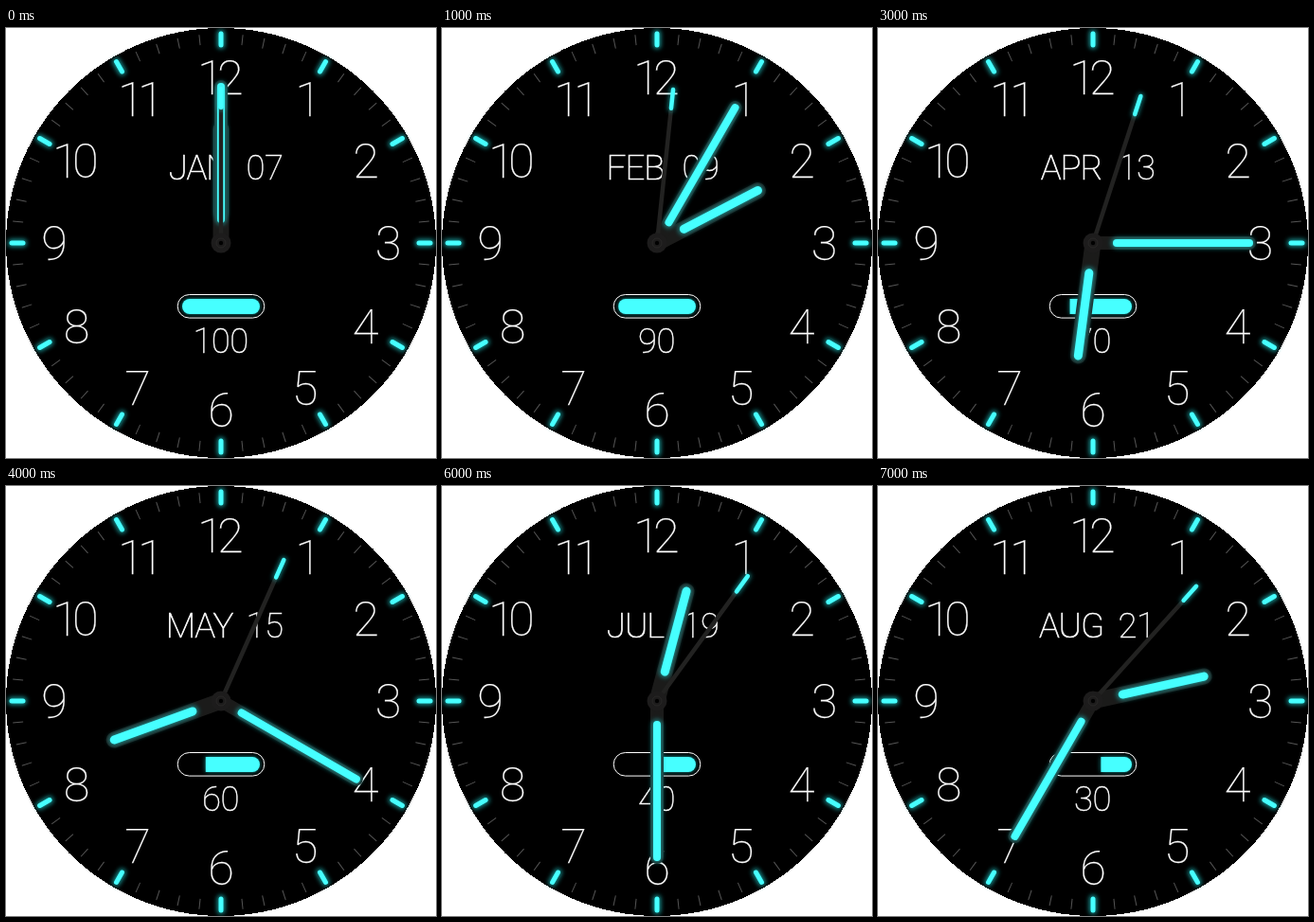
An HTML page for the animation above (8000 ms loop, 454 by 454 pixels).

```html
<!DOCTYPE html>
<html lang="en">
<head>
<meta charset="utf-8">
<title>Watch face</title>
<style>
html, body { margin: 0; width: 100%; height: 100%; overflow: hidden; background: #fff; }
svg { display: block; width: 100vw; height: 100vh; }
text { font-family: Roboto, Lato, sans-serif; font-weight: 200; fill: #fff; stroke: #fff; stroke-width: .25px; }
.num { font-size: 50.6px; }
.month { font-size: 36.6px; letter-spacing: -1px; stroke-width: .7px; }
.small { font-size: 36.6px; letter-spacing: -.6px; stroke-width: .45px; }
.mid { text-anchor: middle; }
.pair { letter-spacing: -6.8px; }
line { stroke-linecap: round; }
.lume { stroke: #46ffff; }
.glow { stroke: #20d8d8; filter: url(#blur); }
</style>
</head>
<body>
<svg viewBox="-227 -227 454 454">
  <defs>
    <filter id="blur" filterUnits="userSpaceOnUse" x="-230" y="-230" width="460" height="460">
      <feGaussianBlur stdDeviation="2.4"/>
    </filter>
    <clipPath id="level"><rect id="cut" x="-49" y="50" width="100" height="35"/></clipPath>
    <rect id="cell" x="-41" y="59" width="82" height="16" rx="8" clip-path="url(#level)"/>
  </defs>
  <circle r="227" shape-rendering="crispEdges"/>
  <g id="ticks"></g>
  <g id="labels"></g>
  <g filter="url(#blur)" opacity=".65"><use href="#cell" fill="#20d8d8"/></g>
  <use href="#cell" fill="#46ffff"/>
  <rect x="-45.8" y="54.5" width="91.6" height="24.6" rx="12.3" fill="none" stroke="#fff"/>
  <g id="hands"></g>
  <circle r="10.5" fill="#1d1c1c"/>
  <circle r="5" fill="none" stroke="#292827"/>
  <circle r="2.2"/>
</svg>
<script>
const STEP = 1000, STEPS = 8;
const MONTHS = ["JAN", "FEB", "MAR", "APR", "MAY", "JUN", "JUL", "AUG"];
const $ = id => document.getElementById(id);

function add(parent, tag, attrs) {
  const el = document.createElementNS("http://www.w3.org/2000/svg", tag);
  for (const key in attrs) el.setAttribute(key, attrs[key]);
  return parent.appendChild(el);
}

// A radial line pointing at 12 o'clock, from radius a to radius b.
function ray(parent, a, b, width, attrs) {
  return add(parent, "line", { x1: 0, y1: -a, x2: 0, y2: -b, "stroke-width": width, ...attrs });
}

function label(x, y, cls, str = "") {
  const el = add($("labels"), "text", { x: x - 227, y: y - 227, class: cls });
  el.textContent = str;
  return el;
}

function lume(parent, a, b, width, spread, opacity) {
  ray(parent, a, b, width + spread, { class: "glow", opacity });
  ray(parent, a, b, width, { class: "lume" });
}

function hand(a, b, width, body) {
  const g = add($("hands"), "g", {});
  ray(g, 0, b, body, { stroke: "#1b1b1a" });
  lume(g, a, b, width, 3, .6);
  return g;
}

for (let i = 0; i < 60; i++) {
  const g = add($("ticks"), "g", { transform: `rotate(${i * 6})` });
  if (i % 5) ray(g, 210, 221, 1, { stroke: "#555", style: "stroke-linecap:butt" });
  else lume(g, 209, 221, 5, 3, .7);
}

[[319, 92.5], [380, 157.5], [403.5, 245], [379.5, 333], [315.5, 398],
 [227, 421], [139, 398], [74.5, 333], [51, 245]]
  .forEach(([x, y], i) => label(x, y, "num mid", i + 1));
[[49, 157.5], [118, 92.5], [202, 69.5]]
  .forEach(([x, y], i) => label(x, y, "num pair", i + 10));

const month = label(204, 160, "month mid");
const day = label(273, 160, "small mid");
const charge = label(226.5, 343, "small mid");

const hour = hand(32, 120, 9, 17);
const minute = hand(25, 165, 8, 14);
const second = add($("hands"), "g", {});
ray(second, 0, 142, 4.5, { stroke: "#222221" });
lume(second, 143, 163, 4.5, 2, .6);

const turn = (el, deg) => el.setAttribute("transform", `rotate(${deg})`);

function draw(k) {
  const level = 100 - 10 * k;
  month.textContent = MONTHS[k];
  day.textContent = String(7 + 2 * k).padStart(2, "0");
  charge.textContent = level;
  $("cut").setAttribute("x", -8 + (50 - level) * .82);
  turn(hour, 62.5 * k);
  turn(minute, 30 * k);
  turn(second, 6 * k);
}

const start = performance.now();
let shown = -1;
function tick() {
  const k = Math.floor((performance.now() - start) / STEP) % STEPS;
  if (k !== shown) draw(shown = k);
  requestAnimationFrame(tick);
}
tick();
</script>
</body>
</html>
```
